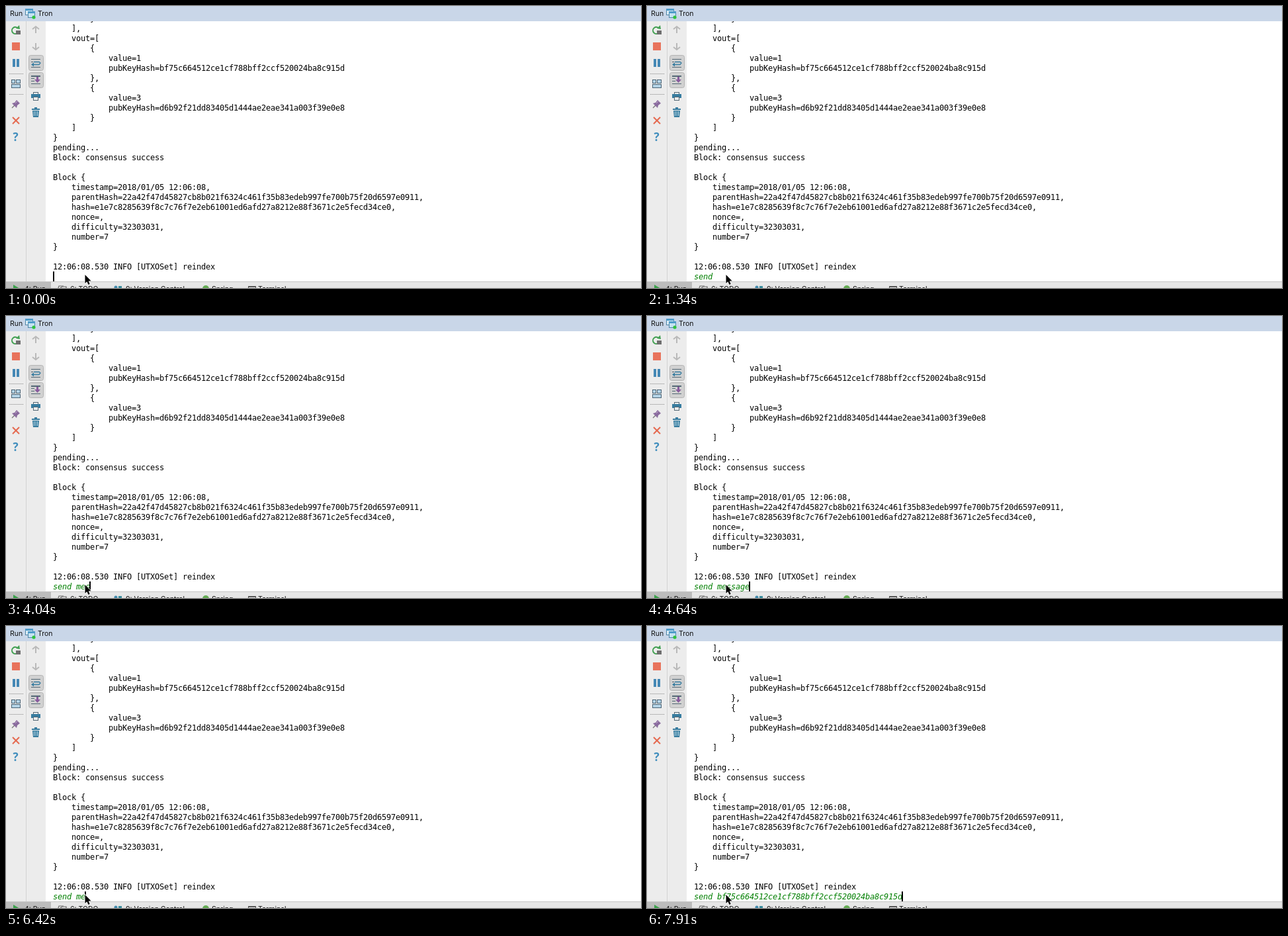
An HTML page with a canvas that plays this animation: 960x426 px, repeating every 8000 ms.

```html
<!DOCTYPE html>
<html lang="en">
<head>
<meta charset="utf-8">
<title>Run console</title>
<style>
  html, body { margin: 0; width: 100%; height: 100%; overflow: hidden; background: #fff; }
  canvas { display: block; }
</style>
</head>
<body>
<canvas id="stage" width="960" height="426"></canvas>
<script>
const ctx = document.getElementById('stage').getContext('2d');
const LOOP = 8000, LEFT = 71, CELL = 7, ROW = 15, FIRST_BASELINE = 23;
const MONO = '12px "DejaVu Sans Mono", monospace';
const UI = '10.5px Inter, sans-serif';
const KEY = 'bf75c664512ce1cf788bff2ccf520024ba8c915d';

const log = `        }
    ],
    vout=[
        {
            value=1
            pubKeyHash=${KEY}
        },
        {
            value=3
            pubKeyHash=d6b92f21dd83405d1444ae2eae341a003f39e0e8
        }
    ]
}
pending...
Block: consensus success

Block {
    timestamp=2018/01/05 12:06:08,
    parentHash=22a42f47d45827cb8b021f6324c461f35b83edeb997fe700b75f20d6597e0911,
    hash=e1e7c8285639f8c7c76f7e2eb61001ed6afd27a8212e88f3671c2e5fecd34ce0,
    nonce=,
    difficulty=32303031,
    number=7
}

12:06:08.530 INFO [UTXOSet] reindex`.split('\n');

// [start ms, typed length, caret shown]
const typing = [
  [0, 0, 1], [150, 1, 1], [300, 2, 1], [450, 3, 1], [750, 4, 1],
  [1340, 4, 0], [1940, 4, 1], [2390, 4, 0], [2840, 4, 1], [2990, 5, 1],
  [3590, 6, 1], [3740, 7, 1], [4040, 8, 1], [4190, 9, 1], [4340, 10, 1],
  [4640, 12, 1], [5390, 12, 0], [5830, 11, 1], [5980, 10, 1], [6120, 9, 1],
  [6270, 8, 1], [6420, 7, 1], [6570, 6, 1], [6870, 5, 1], [7320, 5, 0],
  [7910, 45, 1]
];

function rect(color, x, y, w, h) {
  ctx.fillStyle = color;
  ctx.fillRect(x, y, w, h);
}

function frame(color, x, y, w, h) {
  ctx.strokeStyle = color;
  ctx.lineWidth = 1;
  ctx.strokeRect(x + 0.5, y + 0.5, w - 1, h - 1);
}

function trace(points) {
  ctx.beginPath();
  for (let i = 0; i < points.length; i += 2) ctx.lineTo(points[i], points[i + 1]);
}

function poly(color, ...points) {
  trace(points);
  ctx.fillStyle = color;
  ctx.fill();
}

function line(color, width, ...points) {
  trace(points);
  ctx.strokeStyle = color;
  ctx.lineWidth = width;
  ctx.stroke();
}

function disc(color, x, y, r) {
  ctx.beginPath();
  ctx.arc(x, y, r, 0, Math.PI * 2);
  ctx.fillStyle = color;
  ctx.fill();
}

function label(text, x, y, font = UI) {
  ctx.font = font;
  ctx.fillStyle = '#111';
  ctx.fillText(text, x, y);
}

function mono(text, column, row, color, style = '') {
  ctx.font = style + MONO;
  ctx.letterSpacing = '0px';
  ctx.letterSpacing = CELL - ctx.measureText('0').width + 'px';
  ctx.fillStyle = color;
  ctx.fillText(text, LEFT + column * CELL, FIRST_BASELINE + row * ROW);
  ctx.letterSpacing = '0px';
}

function titleBar() {
  rect('#c9d6e8', 0, 0, 960, 23);
  label('Run', 6, 15);
  label('Tron', 48, 15);
  rect('#dcecf6', 29, 4, 12, 10);
  frame('#4f86a8', 29, 4, 12, 10);
  rect('#4f9cc9', 29, 4, 12, 3);
  rect('#c5e3f3', 33, 8, 11, 10);
  frame('#4f86a8', 33, 8, 11, 10);
  rect('#4f9cc9', 33, 8, 11, 3);
  disc('#2fc23f', 42, 17, 2.6);
}

function dots(y) {
  for (let x = 5; x < 27; x += 2) rect('#858585', x, y, 1, 1);
}

function runTools() {
  ctx.beginPath();
  ctx.arc(14, 37, 5, 0.9, 5.4);
  ctx.strokeStyle = '#42a052';
  ctx.lineWidth = 2;
  ctx.stroke();
  poly('#42a052', 15, 34, 21, 35, 20, 29);
  rect('#6e6e6e', 15, 37, 7, 6);

  rect('#e8735b', 9, 55, 12, 12);
  rect('#4588b5', 10, 80, 4, 12);
  rect('#4588b5', 16, 80, 4, 12);

  dots(102);
  for (const [x, w] of [[8, 6], [15, 7]]) {
    rect('#b5d5e8', x, 111, w, 6);
    frame('#4b6475', x, 111, w, 6);
  }
  rect('#b5d5e8', 8, 118, 14, 6);
  frame('#4b6475', 8, 118, 14, 6);
  dots(133);

  line('#777', 1.3, 9, 154, 13, 150);
  poly('#8a6b9e', 9, 147, 13, 146, 16, 142, 21, 147, 17, 150, 16, 154);
  line('#c5b1d0', 1, 14, 147, 17, 144);

  line('#e66a50', 2, 10, 168, 20, 178);
  line('#e66a50', 2, 20, 168, 10, 178);
  ctx.font = 'bold 17px "Open Sans", sans-serif';
  ctx.fillStyle = '#3f8dbd';
  ctx.fillText('?', 10.5, 204);
}

function pressed(y) {
  ctx.beginPath();
  ctx.roundRect(34.5, y + 0.5, 22, 23, 3);
  ctx.fillStyle = '#d1d1d1';
  ctx.fill();
  ctx.strokeStyle = '#b4b4b4';
  ctx.lineWidth = 1;
  ctx.stroke();
}

function consoleTools() {
  const pale = '#b9b9b9', dark = '#546875', blue = '#377c9f', violet = '#8a5c9e';
  for (const [y, way] of [[36, -1], [61, 1]]) {
    rect(pale, 44, y - 5, 2, 10);
    line(pale, 2, 40, y + way, 45, y + way * 5, 50, y + way);
  }

  pressed(74);
  rect(dark, 38, 80, 14, 1);
  rect(dark, 38, 84, 3, 1);
  rect(dark, 38, 92, 14, 1);
  line(blue, 1.3, 42, 84.5, 50, 84.5, 52, 86, 50, 88.5, 41, 88.5);
  poly(blue, 38, 88.5, 42, 85.5, 42, 91.5);

  pressed(100);
  rect(dark, 38, 105, 14, 2);
  rect(dark, 38, 109, 5, 1);
  rect(dark, 38, 113, 5, 1);
  rect(dark, 38, 117, 14, 1);
  rect(violet, 46, 107, 3, 5);
  poly(violet, 43, 111, 52, 111, 47.5, 116);

  frame(dark, 41, 130, 8, 4);
  rect(blue, 38, 133, 14, 6);
  rect('#eee', 41, 137, 8, 6);
  frame(dark, 41, 137, 8, 6);

  rect(blue, 39, 155, 12, 2);
  rect(blue, 43, 153, 4, 2);
  poly(blue, 40, 158, 50, 158, 49, 168, 41, 168);
  for (const x of [42, 44.5, 47]) rect('#b9d8e6', x, 159, 1, 7);
}

function bottomBar() {
  rect('#e6e6e6', 0, 416, 960, 10);
  rect('#bcbcbc', 0, 416, 68, 10);
  rect('#c6c6c6', 0, 416, 960, 1);
  const y = 430.5;
  label('4: Run', 28, y);
  label('6: TODO', 97, y);
  label('9: Version Control', 181, y);
  label('Spring', 311, y);
  label('Terminal', 381, y);
  poly('#3da34d', 11, 421, 21, 427, 11, 433);
  line('#666', 1.2, 79, 426, 80, 423, 87, 423);
  line('#666', 1.2, 82, 426, 85, 424, 91, 424, 91, 430);
  disc('#438bad', 166, 425, 2.5);
  rect('#398c9d', 170, 423, 5, 5);
  disc('#65ad55', 302, 427, 5);
  rect('#ededed', 366, 423, 12, 9);
  frame('#555', 366, 423, 12, 9);
  rect('#555', 366, 423, 12, 2);
}

function pointer() {
  const shape = [119.5, 406, 119.5, 419, 122.4, 416.3, 124.4, 421, 126.7, 420, 124.7, 415.5, 128.5, 415.3];
  trace(shape);
  ctx.closePath();
  ctx.strokeStyle = '#fff';
  ctx.lineWidth = 1.5;
  ctx.stroke();
  ctx.fillStyle = '#000';
  ctx.fill();
}

function draw(time) {
  const [, length, caret] = typing.findLast(step => step[0] <= time);
  const command = 'send ' + (length > 12 ? KEY : 'message');

  rect('#fff', 0, 0, 960, 426);
  ctx.save();
  ctx.beginPath();
  ctx.rect(60, 23, 900, 393);
  ctx.clip();
  log.forEach((text, row) => {
    const body = text.trimStart();
    mono(body, text.length - body.length, row, '#000');
  });
  mono(command.slice(0, length), 0, log.length, '#007f00', 'italic ');
  if (caret) rect('#000', Math.max(LEFT, LEFT + length * CELL - 1), 401, 2, 15);
  ctx.restore();

  titleBar();
  rect('#ececec', 0, 23, 60, 393);
  rect('#d2d2d2', 30, 23, 1, 393);
  runTools();
  consoleTools();
  bottomBar();
  pointer();
}

function tick() {
  draw(performance.now() % LOOP);
  requestAnimationFrame(tick);
}
tick();
</script>
</body>
</html>
```
